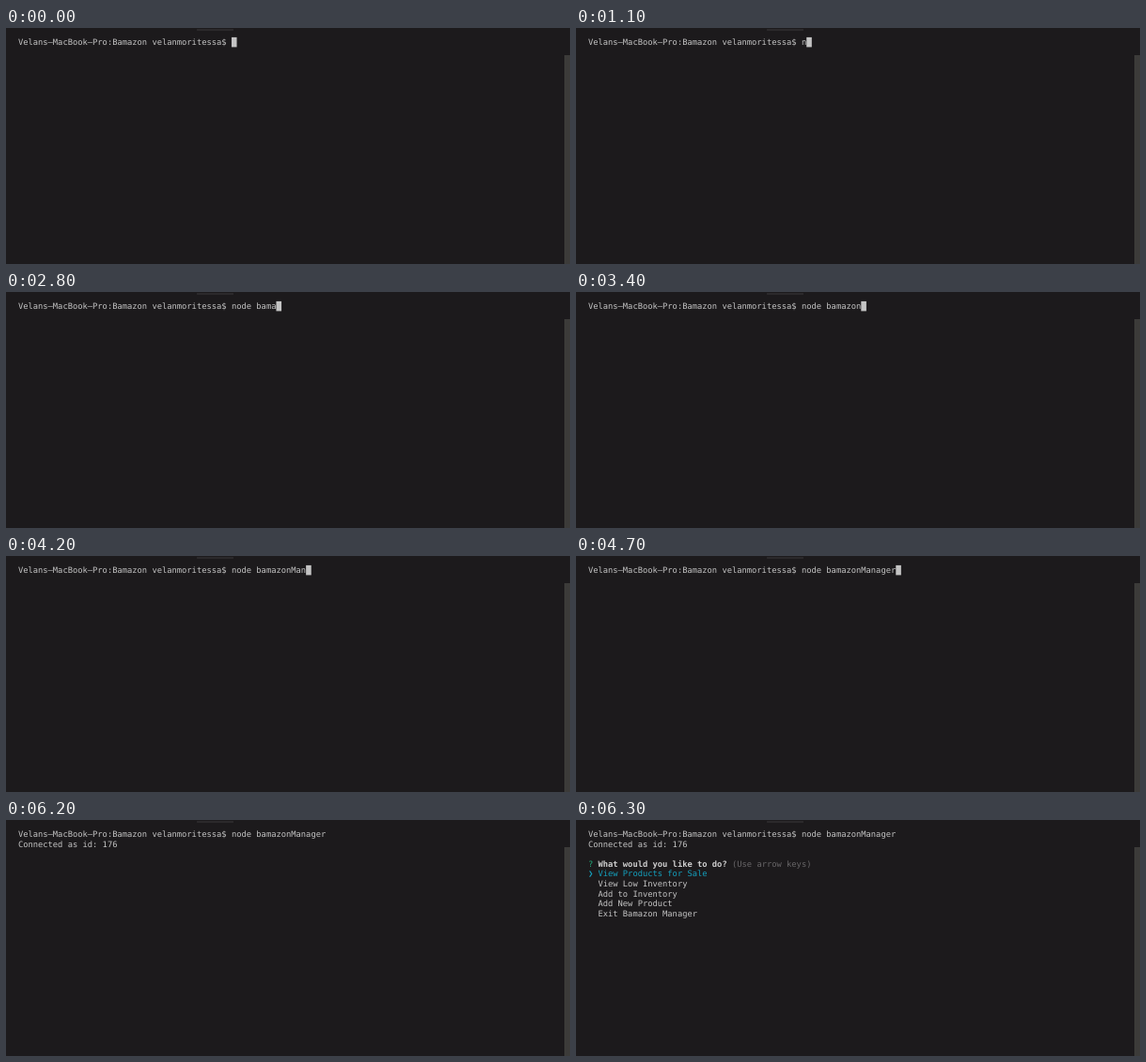
An HTML page for the animation above (8 s loop, 600x252 px).

```html
<!DOCTYPE html>
<html lang="en">
<head>
<meta charset="utf-8">
<title>Terminal session</title>
<style>
  html, body { margin: 0; width: 100%; height: 100%; overflow: hidden; background: #1c1a1c; }
  svg { display: block; width: 600px; height: 252px; }
  text {
    font: 8.77px "DejaVu Sans Mono", "Liberation Mono", monospace;
    fill: #c4c4c4; white-space: pre; text-rendering: geometricPrecision;
  }
  .bold { font-weight: bold; fill: #cfcfcf; }
  .green { fill: #22a878; }
  .cyan { fill: #14a0bd; }
  .dim { fill: #686668; }
</style>
</head>
<body>
<svg id="stage" viewBox="0 0 600 252">
  <rect width="600" height="252" fill="#1c1a1c"/>
  <rect x="203" y="1.5" width="39" height="1" fill="#3a383a"/>
  <rect x="594" y="29" width="6" height="223" fill="#3c3b39"/>
</svg>
<script>
const LOOP = 8000, LEFT = 12.9, CELL = 5.28, LINE = 10.57;
const PROMPT = "Velans–MacBook–Pro:Bamazon velanmoritessa$ ";
const COMMAND = "node bamazonManager";
// One time per typed character; equal times land together.
const KEYS = [1100, 1200, 1300, 1500, 2200, 2500, 2600, 2800, 2800, 3200,
              3400, 3400, 3900, 4000, 4200, 4300, 4400, 4600, 4700];
const ENTER = 5500, CONNECTED = 6200, MENU = 6300;

const stage = document.getElementById("stage");

function add(tag, attrs, parent = stage) {
  const node = document.createElementNS("http://www.w3.org/2000/svg", tag);
  for (const key in attrs) node.setAttribute(key, attrs[key]);
  return parent.appendChild(node);
}

function write(row, col, content, style = "", parent = stage) {
  const node = add("text", { x: LEFT + col * CELL, y: 18.1 + row * LINE, class: style }, parent);
  node.textContent = content;
  return node;
}

function show(node, visible) {
  node.setAttribute("visibility", visible ? "visible" : "hidden");
}

write(0, 0, PROMPT);
const typed = write(0, PROMPT.length, "");
const cursor = add("rect", { width: 5.6, height: 10.5, fill: "#c4c4c4" });
const connected = write(1, 0, "Connected as id: 176");
const menu = add("g", {});
write(3, 0, "?", "green", menu);
write(3, 2, "What would you like to do?", "bold", menu);
write(3, 29, "(Use arrow keys)", "dim", menu);
write(4, 0, "❯", "cyan", menu);
["View Products for Sale", "View Low Inventory", "Add to Inventory",
 "Add New Product", "Exit Bamazon Manager"].forEach((item, i) =>
  write(4 + i, 2, item, i ? "" : "cyan", menu));

function render(t) {
  const count = KEYS.filter(key => key <= t).length;
  const entered = t >= ENTER;
  typed.textContent = COMMAND.slice(0, count);
  cursor.setAttribute("x", LEFT + (entered ? 0 : PROMPT.length + count) * CELL);
  cursor.setAttribute("y", 9.9 + (entered ? LINE : 0));
  show(cursor, t < CONNECTED);
  show(connected, t >= CONNECTED);
  show(menu, t >= MENU);
}

const start = performance.now();
function tick() {
  render((performance.now() - start) % LOOP);
  requestAnimationFrame(tick);
}
tick();
</script>
</body>
</html>
```
